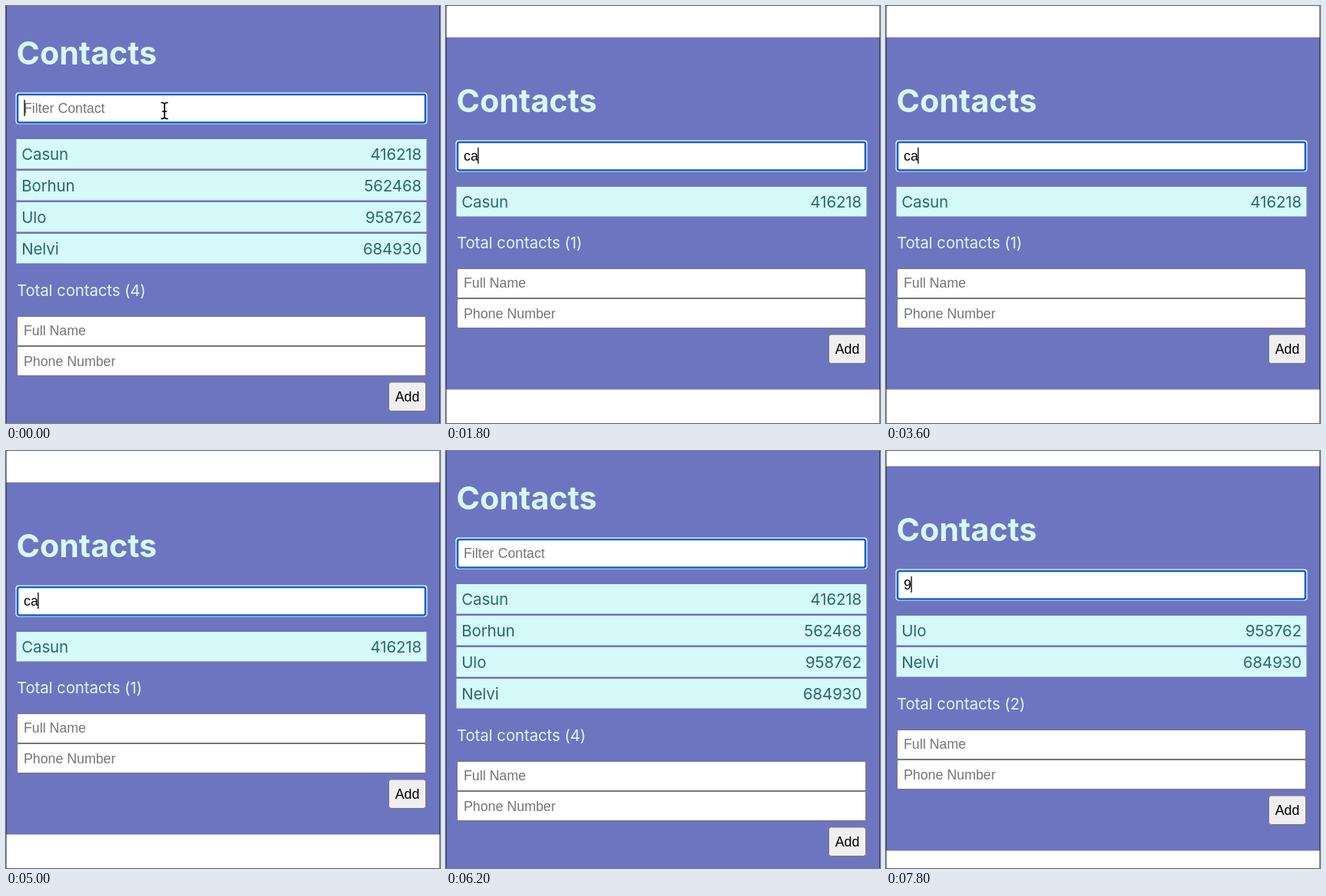
An HTML page for the animation above (8 s loop, 564 by 542 pixels).

```html
<!DOCTYPE html>
<html lang="en">
<head>
<meta charset="utf-8">
<title>Contacts</title>
<style>
  html, body { margin: 0; width: 100%; height: 100%; overflow: hidden; background: #fff; }
  svg { display: block; width: 564px; height: 542px; }
  text { white-space: pre; }
  .ui { font: 20.4px Inter, sans-serif; letter-spacing: -.1px; }
  .field { font: 17.75px "Liberation Sans", Arial, sans-serif; }
  .title { font: 700 41.2px Inter, sans-serif; fill: #d7f9f9; }
  .total { fill: #dcf7fa; }
  .row rect { fill: #d6f9fa; }
  .row text { fill: #28696e; }
  .box { fill: #fff; stroke: #767676; }
  .hint { fill: #757575; }
</style>
</head>
<body>
<svg viewBox="0 0 564 542">
  <rect id="panel" width="564" fill="#6d75c0"/>
  <path d="M.5 0V542M563.5 0V542" stroke="#000" stroke-opacity=".5"/>

  <!-- Both groups are laid out for one row and slide apart as rows are added. -->
  <g id="head">
    <text class="title" x="13.5" y="137.5">Contacts</text>
    <rect x="12.5" y="174.5" width="535" height="41" rx="4" fill="#fff"/>
    <rect x="15" y="177" width="530" height="36.5" rx="2.5" fill="#fff" stroke="#0c62cc" stroke-width="2.6"/>
    <text id="query" class="field" x="23" y="201"></text>
    <rect id="caret" y="184" width="1.3" height="21"/>
    <g id="rows" class="ui"></g>
    <g id="pointer" fill="none" stroke-linecap="round">
      <path id="beam" stroke="#fff" stroke-width="4"
        d="M202 187.5c2.5 0 4 .8 4 2.8c0-2 1.5-2.8 4-2.8M206 190V206M202 208.5c2.5 0 4-.8 4-2.8c0 2 1.5 2.8 4 2.8M203.5 199H208.5"/>
      <use href="#beam" id="beamInk"/>
    </g>
  </g>

  <g id="foot">
    <text id="total" class="ui total" x="14" y="315"></text>
    <g class="field">
      <rect class="box" x="14.5" y="341.5" width="531" height="38" rx="2"/>
      <text class="hint" x="23" y="366.3">Full Name</text>
      <rect class="box" x="14.5" y="380.5" width="531" height="38" rx="2"/>
      <text class="hint" x="23" y="405.5">Phone Number</text>
      <rect class="box" x="497.5" y="427" width="48" height="37.5" rx="3" style="fill:#efefef"/>
      <text x="521.5" y="451.7" text-anchor="middle">Add</text>
    </g>
  </g>
</svg>
<script>
const LOOP = 8000, STEP = 200, PITCH = 41.25;
const contacts = [
  ['Casun', '416218'],
  ['Borhun', '562468'],
  ['Ulo', '958762'],
  ['Nelvi', '684930']
];
// Edit time (the caret blink restarts here), field content, caret x.
const edits = [
  [-300, '', 23.4],
  [1400, 'c', 32],
  [1600, 'ca', 41.2],
  [5600, 'c', 32],
  [5700, '', 23.4],
  [7600, '9', 32.4]
];

const el = id => document.getElementById(id);
const show = (id, on) => el(id).setAttribute('visibility', on ? 'visible' : 'hidden');

// The dark stroke of the pointer sits on its white outline.
const ink = el('beam').cloneNode();
ink.removeAttribute('id');
ink.setAttribute('stroke', '#000');
ink.setAttribute('stroke-width', '1.7');
el('beamInk').replaceWith(ink);

function rowMarkup([name, phone], i) {
  const y = Math.round(234.5 + i * PITCH);
  return `<g class="row"><rect x="13.5" y="${y}" width="533" height="38.5"/>` +
    `<text x="20.3" y="${y + 27}">${name}</text>` +
    `<text x="540" y="${y + 27}" text-anchor="end">${phone}</text></g>`;
}

function layout(query) {
  const found = contacts.filter(c => c.some(s => s.toLowerCase().includes(query)));
  const shift = Math.round((found.length - 1) * PITCH / 2);
  el('rows').innerHTML = found.map(rowMarkup).join('');
  el('total').textContent = `Total contacts (${found.length})`;
  el('query').textContent = query || 'Filter Contact';
  el('query').setAttribute('class', query ? 'field' : 'field hint');
  el('head').setAttribute('transform', `translate(0 ${-shift})`);
  el('foot').setAttribute('transform', `translate(0 ${shift})`);
  el('panel').setAttribute('y', 40.7 - shift);
  el('panel').setAttribute('height', 457.8 + 2 * shift);
}

let shown;
function draw(now) {
  const t = Math.floor(now % LOOP / STEP) * STEP;
  const edit = edits.filter(e => e[0] <= t).pop();
  const [start, query, caretX] = edit;
  if (edit !== shown) {
    layout(query);
    el('caret').setAttribute('x', caretX);
    shown = edit;
  }
  show('caret', (t - start) % 1000 < 500);
  show('pointer', t < edits[1][0]);
}

const origin = performance.now();
function tick() {
  draw(performance.now() - origin);
  requestAnimationFrame(tick);
}
tick();
</script>
</body>
</html>
```
